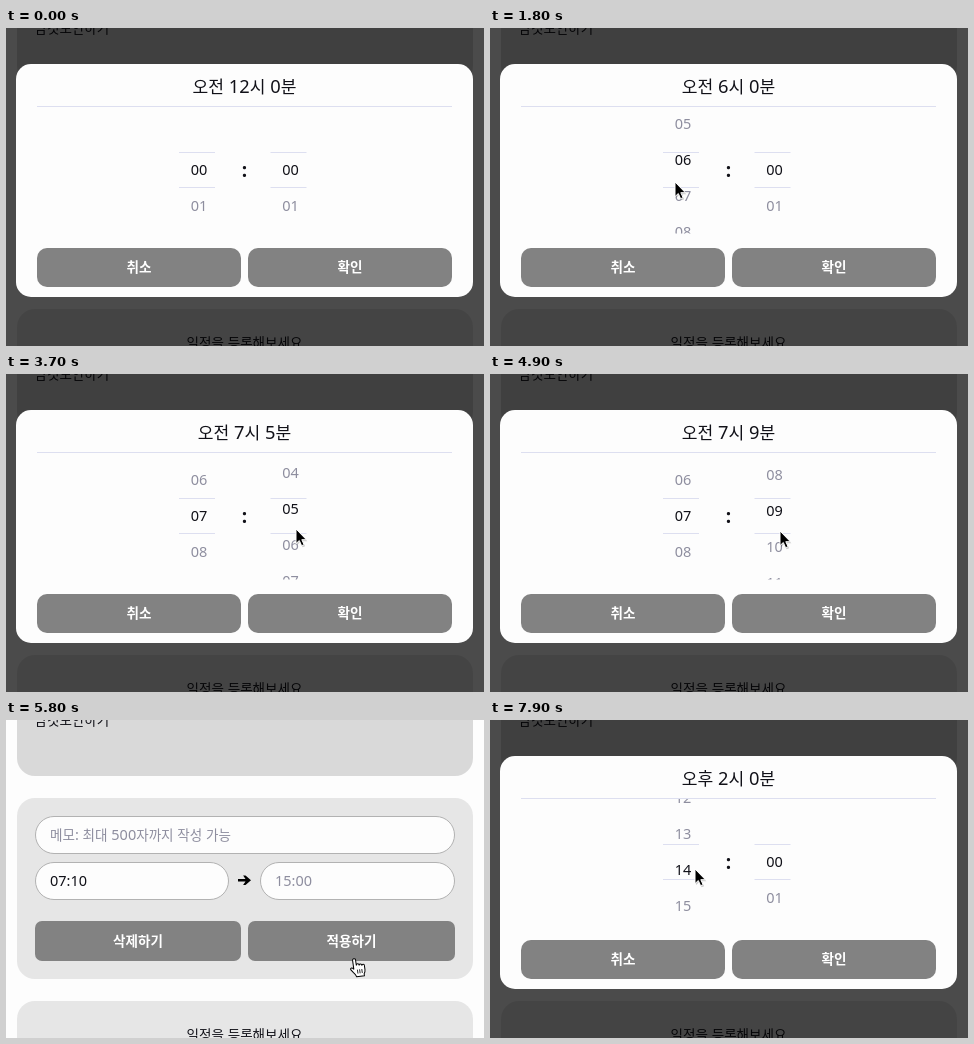
These frames come from a looping animation (478 px wide and 318 px high, 8 s). An HTML page:

```html
<!DOCTYPE html>
<html lang="ko">
<head>
<meta charset="utf-8">
<title>시간 선택</title>
<style>
  html, body { margin: 0; width: 100%; height: 100%; overflow: hidden; background: #fdfdfd; }
  svg { display: block; width: 100%; height: 100%; }
  text { font: 14.5px "Noto Sans", "Noto Sans CJK KR", "Noto Sans CJK", sans-serif; fill: #111118; white-space: pre; }
  .ko { font-size: .935em; }
  .mid { text-anchor: middle; }
  .medium { font-weight: 500; }
  .hint { fill: #8e8e9f; }
  .label { font-weight: 600; fill: #fff; text-anchor: middle; }
  .title { font-size: 18.3px; font-weight: 500; text-anchor: middle; }
  .button { fill: #828282; }
  .field { fill: #fdfdfd; stroke: #b2b2b2; }
  .rule { stroke: #dddff0; }
</style>
</head>
<body>
<svg id="stage" viewBox="0 0 478 318">
  <defs>
    <clipPath id="wheel"><rect x="160" y="79" width="150" height="126.5"/></clipPath>
  </defs>
  <rect width="478" height="318" fill="#fdfdfd"/>
  <g id="page"></g>
  <g id="modal">
    <rect width="478" height="318" opacity=".7"/>
    <rect x="10" y="36" width="457" height="233" rx="15" fill="#fdfdfd"/>
  </g>
  <g id="arrow">
    <path d="M1 1.5V16l3.3-3 2.3 5.2 2.5-1-2.2-5h4.5Z" opacity=".2"/>
    <path d="M0 0V14.6l3.3-3.1 2.3 5.2 2.5-1-2.3-5h4.6Z" stroke="#fff" stroke-width="1"/>
  </g>
  <g id="hand">
    <g transform="rotate(-8)" stroke="#000" stroke-linejoin="round">
      <path fill="#fff" d="M-1.6 10V1.2a1.5 1.5 0 0 1 3 0V6.5a1.4 1.4 0 0 1 2.8.3a1.4 1.4 0 0 1 2.7.6a1.3 1.3 0 0 1 2.5.8V12q0 2-1.4 4V18H.2q-.5-2.2-2.6-4.5L-4.6 10.4q-.6-1.6.9-1.8q1 0 2.1 1.4Z"/>
      <path fill="none" stroke-width=".8" d="M1.9 11v4M4.1 11v4M6.3 11v4"/>
    </g>
  </g>
</svg>
<script>
const LOOP = 8000, STEP = 100, ROW = 36;
const NS = 'http://www.w3.org/2000/svg';
const $ = id => document.getElementById(id);
const page = $('page'), modal = $('modal'), arrow = $('arrow'), hand = $('hand');

function add(parent, tag, attrs) {
  const el = document.createElementNS(NS, tag);
  for (const key in attrs) el.setAttribute(key, attrs[key]);
  return parent.appendChild(el);
}

// Hangul is set slightly smaller than the digits beside it.
function setText(el, str) {
  if (el.dataset.str === str) return;
  el.dataset.str = str;
  el.textContent = '';
  for (const run of str.match(/[가-힣]+|[^가-힣]+/g)) {
    add(el, 'tspan', /[가-힣]/.test(run) ? { class: 'ko' } : {}).textContent = run;
  }
}

function text(parent, x, y, cls, str) {
  const el = add(parent, 'text', { x, y, class: cls });
  if (str) setText(el, str);
  return el;
}

const box = (parent, x, y, width, height, rx, attrs) =>
  add(parent, 'rect', { x, y, width, height, rx, ...attrs });

const rule = (x1, x2, y) => add(modal, 'line', { x1, x2, y1: y, y2: y, class: 'rule' });

function button(parent, x, y, width, height, rx, str) {
  box(parent, x, y, width, height, rx, { class: 'button' });
  text(parent, x + width / 2, y + height / 2 + 4.9, 'label', str);
}

function field(x, y, width, cls, str) {
  box(page, x + .5, y + .5, width - 1, 37, 18.5, { class: 'field' });
  text(page, x + 15, y + 24.3, cls, str);
}

function buildPage() {
  box(page, 11, -40, 456, 96, 18, { fill: '#d9d9d9' });
  box(page, 11, 78, 456, 181, 18, { fill: '#e6e6e6' });
  box(page, 11, 281, 456, 90, 18, { fill: '#e6e6e6' });
  text(page, 28.5, 5, 'medium', '암것도안하기');
  text(page, 238.5, 320, 'mid medium', '일정을 등록해보세요');
  field(29, 96, 420, 'hint', '메모: 최대 500자까지 작성 가능');
  field(29, 142, 194, '', '07:10');
  field(254, 142, 195, 'hint', '15:00');
  add(page, 'path', { d: 'M232 159h7.5l-2.4-3.6h2.4l5.5 4.8-5.5 4.8h-2.4l2.4-3.6H232Z' });
  button(page, 29, 201, 206, 40, 7, '삭제하기');
  button(page, 242, 201, 207, 40, 7, '적용하기');
}

function buildWheel(x) {
  for (const y of [124.5, 159.5]) rule(x - 20, x + 16, y);
  const group = add(modal, 'g', { 'clip-path': 'url(#wheel)' });
  return Array.from({ length: 5 }, () => text(group, x, 0, 'mid'));
}

buildPage();
rule(31, 446, 78.5);
const title = text(modal, 238.5, 65, 'title');
const hourRows = buildWheel(193), minuteRows = buildWheel(284.5);
const colon = text(modal, 238.5, 149, 'mid', ':');
colon.style.cssText = 'font-size:19px;font-weight:700';
button(modal, 31, 220, 204, 39, 10, '취소');
button(modal, 242, 220, 204, 39, 10, '확인');

// Keys are [time, ...values]; two keys at one time make a jump.
const hourKeys = [[1000, 0], [2000, 7], [5800, 7], [5800, 0], [7100, 0], [7900, 13.78]];
const minuteKeys = [[2600, 0], [2700, .03], [4000, 6], [4200, 6], [4800, 9],
  [4900, 9.14], [5000, 9.6], [5200, 10], [5800, 10], [5800, 0]];
const cursorKeys = [[100, 196, 168], [900, 185, 154], [2000, 185, 154], [2500, 290, 155],
  [4100, 290, 155], [4200, 290, 157], [5000, 290, 157], [5300, 348, 239], [6000, 348, 239],
  [6300, 307, 159], [6500, 307, 157], [6600, 307, 157], [6900, 205, 149]];

function track(keys, t) {
  const next = keys.findIndex(key => key[0] > t);
  if (next < 0) return keys[keys.length - 1].slice(1);
  if (next === 0) return keys[0].slice(1);
  const a = keys[next - 1], b = keys[next];
  const p = (t - a[0]) / (b[0] - a[0]);
  const k = p * p * (3 - 2 * p);
  return a.slice(1).map((v, i) => v + (b[i + 1] - v) * k);
}

function turn(rows, pos) {
  const current = Math.round(pos);
  rows.forEach((row, i) => {
    const n = current + i - 2;
    row.style.display = n < 0 ? 'none' : '';
    if (n < 0) return;
    row.setAttribute('y', 147.2 + (n - pos) * ROW);
    row.setAttribute('class', n === current ? 'mid medium' : 'mid hint');
    setText(row, String(n).padStart(2, '0'));
  });
  return current;
}

const show = (el, on) => { el.style.display = on ? '' : 'none'; };

function render(t) {
  const [hourPos] = track(hourKeys, t), [minutePos] = track(minuteKeys, t);
  const hour = turn(hourRows, hourPos), minute = turn(minuteRows, minutePos);
  setText(title, `${hour < 12 ? '오전' : '오후'} ${hour % 12 || 12}시 ${minute}분`);
  show(modal, t < 5800 || t >= 6500);

  const [x, y] = track(cursorKeys, t);
  const pointing = t >= 5300 && t < 6500;
  show(hand, pointing);
  show(arrow, !pointing && t >= 100);
  for (const el of [hand, arrow]) el.setAttribute('transform', `translate(${x} ${y})`);
}

const start = performance.now();
function tick() {
  const t = (performance.now() - start) % LOOP;
  render(Math.floor(t / STEP) * STEP);
  requestAnimationFrame(tick);
}
tick();
</script>
</body>
</html>
```
